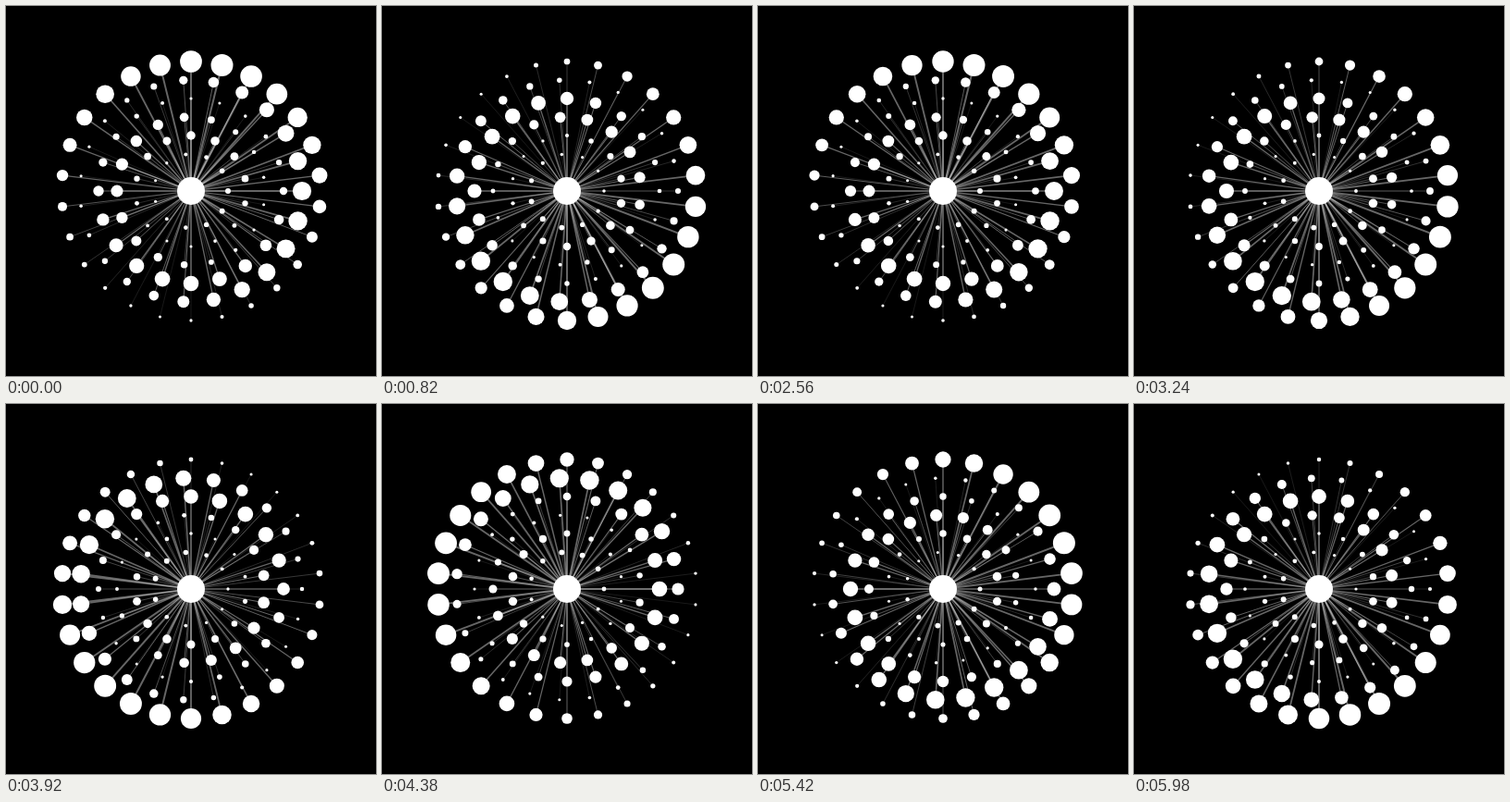
An HTML page with a canvas for the animation above (6 s loop, 400 by 400 pixels).

```html
<!DOCTYPE html>
<html lang="en">
<head>
<meta charset="utf-8">
<title>Pulsing rings</title>
<style>
  html, body { margin: 0; width: 100%; height: 100%; overflow: hidden; background: #000; }
  canvas { display: block; width: 400px; height: 400px; }
</style>
</head>
<body>
<canvas id="stage" width="400" height="400"></canvas>
<script>
const ctx = document.getElementById('stage').getContext('2d');
const TAU = Math.PI * 2;
const LOOP = 6000, STEP = 20;
const SPEED = 0.05, START = 0.22;
const CENTER = 200, MIN_R = 1.5;

// Six rings; each one outward has three more dots and starts a quarter turn earlier.
const dots = [];
for (let ring = 0; ring < 6; ring++) {
  const count = 11 + 3 * ring;
  const radius = 40 + 20 * ring;
  const maxR = 3 + 1.8 * ring;
  for (let i = 0; i < count; i++) {
    const lag = i * TAU / count;
    const angle = lag - ring * TAU / 4;
    dots.push({
      x: CENTER + radius * Math.cos(angle),
      y: CENTER + radius * Math.sin(angle),
      lag, maxR
    });
  }
}

function disc(x, y, r) {
  ctx.beginPath();
  ctx.arc(x, y, r, 0, TAU);
  ctx.fill();
}

function draw(time) {
  const phase = START + SPEED * Math.floor((time % LOOP) / STEP);
  ctx.fillStyle = '#000';
  ctx.fillRect(0, 0, 400, 400);
  ctx.fillStyle = '#fff';
  ctx.strokeStyle = 'rgba(255, 255, 255, 0.4)';
  for (const { x, y, lag, maxR } of dots) {
    const r = MIN_R + (maxR - MIN_R) * (1 + Math.cos(phase - lag)) / 2;
    ctx.lineWidth = r / 6;
    ctx.beginPath();
    ctx.moveTo(CENTER, CENTER);
    ctx.lineTo(x, y);
    ctx.stroke();
    disc(x, y, r);
  }
  disc(CENTER, CENTER, 15);
}

function tick() {
  draw(performance.now());
  requestAnimationFrame(tick);
}
tick();
</script>
</body>
</html>
```
